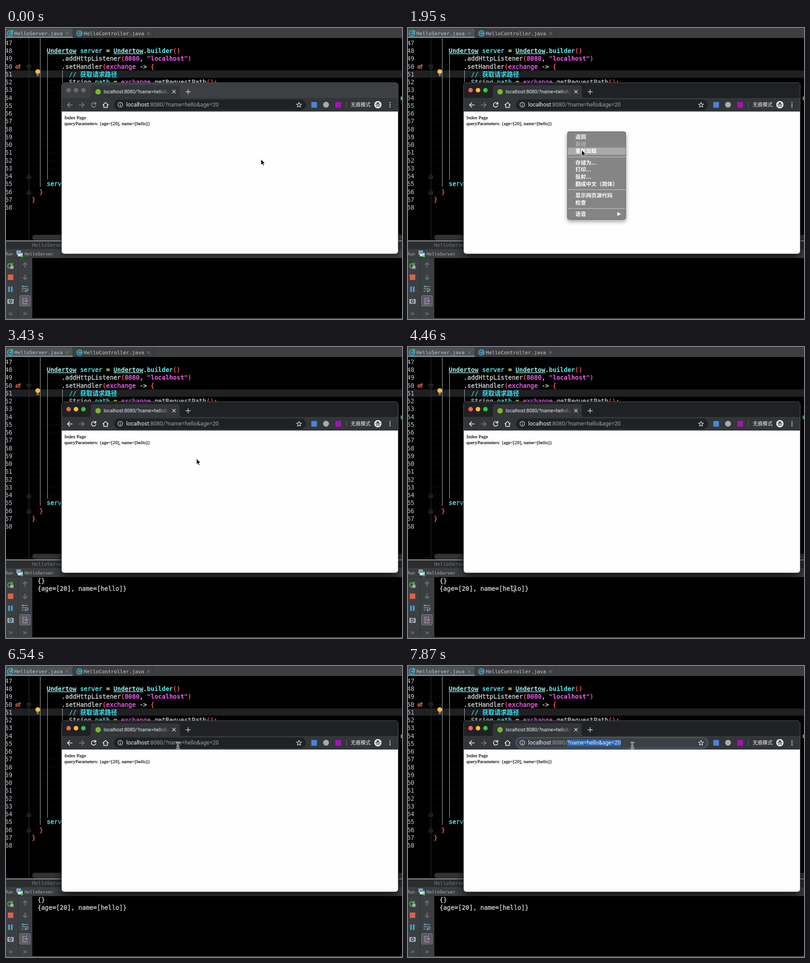
Write an HTML page that moves like this. It is 873x641 px and loops after 8 s.

```html
<!DOCTYPE html>
<html lang="zh">
<head>
<meta charset="utf-8">
<title>Query parameters</title>
<style>
  html, body { margin: 0; width: 100%; height: 100%; overflow: hidden; background: #000; }
  svg { display: block; width: 873px; height: 641px; }
  text { white-space: pre; }
  .mono { font-family: "DejaVu Sans Mono", monospace; }
  .code { font-size: 13.6px; stroke-width: .45; }
  .ui { font-family: Roboto, sans-serif; }
  .cjk { font-family: "Noto Sans CJK SC", "Noto Sans CJK", sans-serif; }
  .page { font: 10.67px "Liberation Serif", serif; fill: #000; stroke: #000; stroke-width: .2; }
  .w { fill: #c9cccc; stroke: #c9cccc; }
  .c { fill: #5ceff0; stroke: #5ceff0; }
  .b { fill: #5ceff0; font-weight: bold; }
  .t { fill: #9df3ee; font-weight: bold; text-decoration: underline; }
  .y { fill: #f2ea55; stroke: #f2ea55; }
  .m { fill: #f75cf2; stroke: #f75cf2; }
  .s { fill: #f75cf2; font-weight: bold; }
  .r { fill: #fb5250; font-weight: bold; }
  .n { fill: #35e2f2; font-weight: bold; font-family: "DejaVu Sans Mono", "Noto Sans CJK SC", monospace; }
  .line { fill: none; stroke-linecap: round; stroke-linejoin: round; }
</style>
</head>
<body>
<svg viewBox="0 0 873 641" xmlns="http://www.w3.org/2000/svg">
  <defs>
    <linearGradient id="fade" gradientUnits="userSpaceOnUse" x1="335" x2="361" y1="0" y2="0">
      <stop offset="0" stop-color="#eceef0"/><stop offset="1" stop-color="#eceef0" stop-opacity="0"/>
    </linearGradient>
    <filter id="shade" x="-20%" y="-20%" width="140%" height="140%">
      <feDropShadow dx="0" dy="4" stdDeviation="5" flood-opacity=".4"/>
    </filter>
    <filter id="deep" x="-10%" y="-15%" width="120%" height="130%">
      <feDropShadow dx="0" dy="8" stdDeviation="10" flood-opacity=".75"/>
    </filter>
    <clipPath id="win"><rect x="123" y="121" width="741" height="376" rx="5"/></clipPath>
  </defs>

  <!-- editor -->
  <rect width="873" height="641"/>
  <rect y="93.5" width="873" height="16" fill="#1e2022"/>
  <path d="M50.5 22V467" stroke="#333537"/>
  <g id="dots" fill="#303030"></g>
  <path d="M75.5 23V350M91.5 58V334M124.5 93V120" stroke="#b4b6b6"/>
  <g id="code" class="mono code"></g>
  <g class="line" stroke="#4c4e50">
    <path d="M46.5 82h8v5l-4 3.5l-4-3.5zM48.5 85h4"/>
    <path d="M46.5 331h8v-5l-4-3.5l-4 3.5zM48.5 328h4M46.5 365.5h8v-5l-4-3.5l-4 3.5zM48.5 362.5h4"/>
  </g>
  <g class="line" stroke="#e6623f" stroke-width="1.6">
    <circle cx="24.5" cy="86" r="3"/><path d="M30 90V81M28 83l2-2.5l2 2.5"/>
  </g>
  <circle cx="24.5" cy="86" r="1.3" fill="#e6623f"/>
  <circle cx="70" cy="96" r="5.3" fill="#f3b947"/>
  <path d="M67.5 102.5h5M67.5 105h5" stroke="#a8a8a8" stroke-width="1.5"/>
  <rect x="870" y="151" width="3" height="8" fill="#25cf2a"/>
  <rect x="58" y="455.5" width="830" height="12" rx="6" fill="#323334"/>

  <!-- editor tabs -->
  <rect width="873" height="22" fill="#3c3f41"/>
  <rect width="147" height="22" fill="#4d5254"/>
  <rect y="19" width="147" height="3" fill="#778f9b"/>
  <path d="M147.5 0V22M324.5 0V22" stroke="#303234"/>
  <path d="M0 .5H873" stroke="#2f3133"/>
  <g id="tabs" class="mono" font-size="11.05" fill="#c6cacc"></g>

  <!-- run panel -->
  <rect y="470" width="873" height="17" fill="#2b2d2e"/>
  <rect y="468" width="873" height="1.8" fill="#a5a7a8"/>
  <rect y="487" width="873" height="20" fill="#3c3f41"/>
  <rect y="506" width="873" height="1" fill="#2a2c2d"/>
  <rect y="507" width="58" height="134" fill="#3c3f41"/>
  <path d="M26.5 507V641" stroke="#2c2e30"/>
  <rect y="639" width="873" height="2" fill="#45484a"/>
  <g class="mono">
    <text x="57.5" y="482" font-size="11" fill="#777a7c">HelloServer</text>
    <g font-size="9.55" fill="#b4b8ba"><text x="-2" y="500.5">Run</text><text x="41" y="500.5">HelloServer</text></g>
  </g>
  <rect x="23" y="490" width="10" height="9" fill="#8fa4ae"/>
  <rect x="26" y="494" width="11" height="9" fill="#d5dde0"/>
  <path d="M26 495.5h11" stroke="#4695c6" stroke-width="3"/>
  <circle cx="35" cy="503" r="2.5" fill="#25cf2a"/>
  <g class="line" stroke-width="2">
    <path d="M9 529a5 5 0 1 1 4.5-7M10 521.5h4v-4" stroke="#4fae55"/>
    <path d="M42 528V517M37.5 521.5l4.5-4.5l4.5 4.5M42 543V554M37.5 549.5l4.5 4.5l4.5-4.5" stroke="#66696c" stroke-width="2.5" stroke-linecap="butt"/>
    <path d="M35 569.5H48M35 574.5h11a2.5 2.5 0 0 1 0 5h-4M44 577.5l-2.5 2l2.5 2M35 579.5h3" stroke="#8ba9b8" stroke-width="1.5"/>
    <path d="M38 567.5l-2.5 2l2.5 2" stroke="#4aa3d8" stroke-width="1.5"/>
    <path d="M7 627l2.5 2.5l-2.5 2.5M11 627l2.5 2.5l-2.5 2.5M39 627l2.5 2.5l-2.5 2.5M43 627l2.5 2.5l-2.5 2.5" stroke="#b5b8ba" stroke-width="1"/>
  </g>
  <rect x="9.5" y="523.5" width="7" height="7" fill="#a8acae"/>
  <rect x="4" y="543" width="12" height="12" fill="#d9624f"/>
  <path d="M6.7 569.5v12M12.8 569.5v12" stroke="#4ca0d1" stroke-width="3.7"/>
  <rect x="3" y="597" width="14" height="10.5" rx="1" fill="#a9b1b5"/>
  <circle cx="10" cy="602" r="3.8" fill="#33444c"/><circle cx="10" cy="602" r="2" fill="#65b2db"/>
  <rect x="30" y="589.5" width="23.5" height="23" rx="2" fill="#55585a" stroke="#8a8d8f"/>
  <path d="M35 595.5h7M35 599.5h5M35 603.5h5M35 607.5h13" stroke="#adb1b3" stroke-width="1.5"/>
  <path d="M45 594v9M42 600.5l3 3l3-3" class="line" stroke="#b873d8" stroke-width="2"/>
  <g id="log" class="mono code w"><text x="69.5" y="520">{}</text><text x="69.5" y="537.3">{age=[20], name=[hello]}</text></g>

  <!-- browser -->
  <rect id="glow" x="122.5" y="120.5" width="742" height="377" rx="5.5" stroke="#55585a"/>
  <g clip-path="url(#win)">
    <rect id="strip" x="122" y="121" width="743" height="34"/>
    <path d="M182 154q5 0 5-5v-17q0-6 6-6h184q6 0 6 6v17q0 5 5 5z" fill="#323639"/>
    <rect x="122" y="154" width="743" height="31" fill="#323639"/>
    <rect x="122" y="184" width="743" height="314" fill="#fefefe"/>
  </g>
  <g id="lights"><circle cx="138" cy="137" r="5"/><circle cx="154.3" cy="137" r="5"/><circle cx="170.7" cy="137" r="5"/></g>
  <circle cx="203" cy="140.5" r="6" fill="#79b929"/>
  <text class="ui" x="215.5" y="144" font-size="10.5" fill="url(#fade)">localhost:8080/?name=hello&amp;a</text>
  <g class="line" stroke="#d2d5d8" stroke-width="1.4">
    <path d="M367 137l6.5 6.5M373.5 137l-6.5 6.5M396.5 140.5h10M401.5 135.5v10"/>
  </g>
  <g class="line" stroke-width="1.6">
    <g id="nav"><path d="M146 169.5H135.5M140.5 164.5l-5 5l5 5"/><path d="M197.5 166.5a5 5 0 1 0 .5 4.5M198 163.5v4h-4"/></g>
    <path d="M161.5 169.5H172M167 164.5l5 5l-5 5" stroke="#808386"/>
    <path d="M213.5 169.5l6-5.5l6 5.5M215.5 168.5v6.5h8v-6.5" stroke="#f1f3f4"/>
  </g>
  <rect id="box" x="238" y="157.5" width="423" height="23.5" rx="11.75" stroke-width="1.7"/>
  <circle cx="252" cy="169" r="5.2" fill="none" stroke="#dfe1e4" stroke-width="1.2"/>
  <path d="M252 168.3v3.7M252 165.8v1.2" stroke="#dfe1e4" stroke-width="1.3"/>
  <rect id="sel" y="162" height="15" fill="#2463b4"/>
  <text class="ui" x="265" y="173.3" font-size="12.3" fill="#9aa0a6"><tspan fill="#f1f3f4">localhost</tspan>:8080/<tspan id="query">?name=hello&amp;age=20</tspan></text>
  <path id="star" class="line" stroke="#d5d8da" stroke-width="1.2"/>
  <rect x="673" y="163" width="12.5" height="12.5" fill="#4a84dc"/>
  <circle cx="705.5" cy="169" r="6.5" fill="#a9aaac"/>
  <rect x="726" y="163" width="12.5" height="12.5" fill="#a512b9"/>
  <path d="M750.5 162.5v13" stroke="#65686b"/>
  <text class="cjk" x="760" y="173.2" font-size="10.9" font-weight="500" fill="#f1f3f4">无痕模式</text>
  <circle cx="819.8" cy="169" r="8" fill="#f1f3f4"/>
  <path d="M814 168h11.6v1.2H814zM816.5 167.3l1-3.3h4.6l1 3.3z" fill="#323639"/>
  <g fill="none" stroke="#323639"><circle cx="817.5" cy="172" r="1.5"/><circle cx="822" cy="172" r="1.5"/></g>
  <g fill="#e0e3e6"><circle cx="846.5" cy="164.8" r="1.3"/><circle cx="846.5" cy="169.2" r="1.3"/><circle cx="846.5" cy="173.6" r="1.3"/></g>
  <g id="body" class="page"><text x="128.7" y="201.4">Index Page</text><text x="128.7" y="213.7">queryParameters: {age=[20], name=[hello]}</text></g>

  <g id="menu">
    <rect x="351.5" y="228.5" width="128.5" height="193" rx="4" fill="#858585" stroke="#5d5d5d" filter="url(#shade)"/>
    <rect id="hover" x="352" width="127.5" height="16" fill="#aaa"/>
    <path d="M352 284H479.5M352 356.3H479.5M352 397.5H479.5" stroke="#b7b7b7" stroke-width="1.5"/>
    <g id="items" class="cjk" font-size="11.7" font-weight="700"></g>
    <path d="M461.5 405.5l8 4.3l-8 4.3z" fill="#fff"/>
  </g>

  <path id="arrow" d="M0 0V12.5L2.9 9.9L5 14.6L7.1 13.7L5.1 9.1H9z" stroke="#fff" stroke-width=".9"/>
  <g id="beam" class="line">
    <path id="stem" d="M-3-6.5Q0-6.5 0-4.5Q0-6.5 3-6.5M0-4.5V4.5M-2 1.5H2M-3 6.5Q0 6.5 0 4.5Q0 6.5 3 6.5" stroke="#f4f4f4" stroke-width="2.6"/>
    <path d="M-3-6.5Q0-6.5 0-4.5Q0-6.5 3-6.5M0-4.5V4.5M-2 1.5H2M-3 6.5Q0 6.5 0 4.5Q0 6.5 3 6.5" stroke="#222" stroke-width=".9"/>
  </g>
</svg>
<script>
const LOOP = 8000, CHAR = 8.19, ROW = 17.25;
const $ = id => document.getElementById(id);
const esc = s => s.replace(/&/g, '&amp;').replace(/</g, '&lt;').replace(/>/g, '&gt;');
const rowY = n => 55 + (n - 48) * ROW;

// Each part is a class letter followed by its text.
function code(n, indent, ...parts) {
  const spans = parts.map(p => `<tspan class="${p[0]}">${esc(p.slice(1))}</tspan>`).join('');
  return `<text x="${57 + indent * CHAR}" y="${rowY(n)}">${spans}</text>`;
}

function buildEditor() {
  let html = '', dots = '';
  for (let n = 47; n <= 68; n++) {
    html += `<text x="14" y="${rowY(n)}" text-anchor="end" fill="#c3c7c8">${n}</text>`;
    const cols = n === 47 || n > 66 ? 0 : n === 66 ? 2 : n === 65 || n === 48 ? 4 : 8;
    for (let i = 0; i < cols; i++)
      dots += `<rect x="${60.5 + i * CHAR}" y="${rowY(n) - 5}" width="1.2" height="1.2"/>`;
  }
  html += code(48, 4, 'tUndertow', 'c server ', 'y= ', 'tUndertow', 'y.', 'bbuilder', 'r()')
    + code(49, 8, 'w.addHttpListener', 'r(', 'm8080', 'w, ', 's"localhost"', 'r)')
    + code(50, 8, 'w.setHandler', 'r(', 'mexchange', 'w -> ', 'r{')
    + code(51, 10, 'n// 获取请求路径')
    + code(52, 10, 'wString ', 'cpath ', 'y= ', 'mexchange', 'w.getRequestPath', 'r()', 'w;')
    + code(65, 4, 'cserver', 'w.start', 'r()')
    + code(66, 2, 'r}') + code(67, 0, 'r}');
  $('code').innerHTML = html;
  $('dots').innerHTML = dots;
  $('tabs').innerHTML = [[9, 'HelloServer.java', 135], [162, 'HelloController.java', 314]].map(([x, name, end]) =>
    `<circle cx="${x}" cy="12" r="7" fill="#4596b4"/>
     <path class="line" d="M${x + 2.5} 9.5a3.5 3.5 0 1 0 0 5" stroke="#203c48" stroke-width="1.5"/>
     <text x="${x + 9.5}" y="16">${name}</text>
     <path d="M${end - 3} 9l6 6m0-6l-6 6" stroke="#85898b"/>`).join('')
    + '<path d="M11 3.5l6 3.5l-6 3.5z" fill="#45c251"/>';
}

function buildMenu() {
  const groups = [[240, '返回', '前进', '重新加载'], [296.5, '存储为...', '打印...', '投射...', '翻成中文（简体）'],
    [368.8, '显示网页源代码', '检查'], [409.7, '语音']];
  $('items').innerHTML = groups.map(([y, ...names]) => names.map((s, i) =>
    `<text x="369" y="${y + i * 15.6 + 4.2}" fill="${s === '前进' ? '#b3b3b3' : '#fff'}">${s}</text>`).join('')).join('');
}

function starPath(cx, cy) {
  let d = '';
  for (let i = 0; i < 10; i++) {
    const a = i * Math.PI / 5, r = i % 2 ? 2.5 : 6;
    d += (i ? 'L' : 'M') + (cx + r * Math.sin(a)).toFixed(1) + ' ' + (cy - r * Math.cos(a)).toFixed(1);
  }
  return d + 'z';
}

// Pointer stops: time, x, y. Each is held until the next.
const stops = [
  [0, 562, 289], [900, 545, 286], [1050, 496, 279], [1200, 448, 274], [1500, 349, 231.5],
  [1800, 366, 248], [1950, 383, 269], [2390, 402, 268], [2540, 485, 254.5], [2690, 482, 253],
  [2990, 465, 250], [3280, 438, 247], [3430, 420, 246], [3570, 370, 290], [3720, 285, 385],
  [3870, 180, 475], [4020, 88, 532], [4160, 118, 536], [4310, 172, 533], [4460, 229, 525.5],
  [4610, 240, 524], [4750, 268, 460], [4900, 305, 350], [5050, 341, 250], [5190, 300, 211],
  [5340, 220, 203], [5490, 150, 194], [5640, 130, 200], [5790, 190, 211], [5940, 126, 211],
  [6090, 250, 232], [6240, 370, 241], [6540, 379, 175], [6990, 371, 175], [7130, 362, 175],
  [7280, 354, 175], [7430, 351, 175], [7720, 425, 174], [7870, 494.5, 175]
];
const beamSpans = [[5190, 6090], [6540, LOOP]];
const show = (id, on) => { $(id).style.display = on ? '' : 'none'; };
const set = (id, name, value) => $(id).setAttribute(name, value);

function update(t) {
  const active = t >= 600;
  set('strip', 'fill', active ? '#202124' : '#3c4043');
  set('glow', 'filter', active ? 'url(#deep)' : 'url(#shade)');
  ['#fb5f57', '#fdbd2e', '#29c941'].forEach((c, i) =>
    $('lights').children[i].setAttribute('fill', active ? c : '#67696c'));
  set('nav', 'stroke', active ? '#f1f3f4' : '#909396');

  show('menu', t >= 1650 && t < 2540);
  set('menu', 'opacity', t < 2390 ? 1 : .45);
  show('hover', t >= 1800);
  set('hover', 'y', t < 1950 ? 232 : 263.3);
  show('body', t < 2390 || t >= 2690);
  show('log', t >= 2690);

  const focus = t >= 6690, all = focus && t < 7430, drag = t >= 7720;
  set('box', 'fill', focus ? '#3c4043' : '#202124');
  set('box', 'stroke', focus ? '#456a9c' : 'none');
  set('sel', 'x', all ? 265 : 350.5);
  set('sel', 'width', all ? 204.5 : t < 7870 ? 74 : 119);
  show('sel', all || drag);
  set('query', 'fill', all || drag ? '#f1f3f4' : '#9aa0a6');

  const [, x, y] = stops.filter(s => s[0] <= t).pop();
  const beam = beamSpans.some(([a, b]) => t >= a && t < b);
  show('beam', beam);
  show('arrow', !beam);
  set(beam ? 'beam' : 'arrow', 'transform', `translate(${x} ${y})`);
}

buildEditor();
buildMenu();
set('star', 'd', starPath(646, 169.5));
const start = performance.now();
function tick() {
  update((performance.now() - start) % LOOP);
  requestAnimationFrame(tick);
}
update(0);
tick();
</script>
</body>
</html>
```
